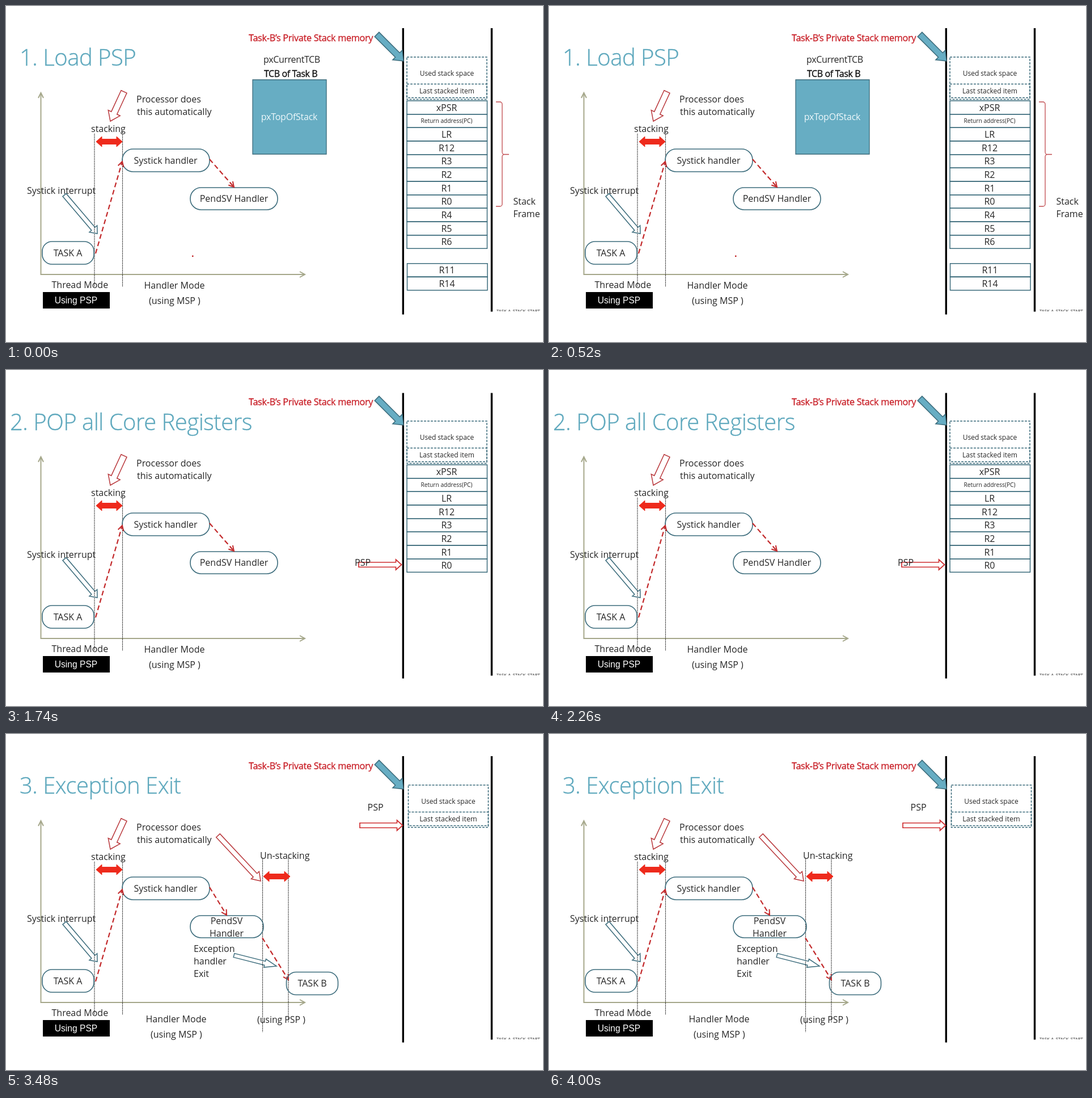
An HTML page with a canvas for the animation above (4350 ms loop, 947 by 592 pixels).

```html
<!DOCTYPE html>
<html lang="en">
<head>
<meta charset="utf-8">
<title>Context switch</title>
<style>
html, body { margin: 0; width: 100%; height: 100%; overflow: hidden; background: #fff; }
canvas { display: block; }
</style>
</head>
<body>
<canvas id="stage" width="947" height="592"></canvas>
<script>
const ctx = document.getElementById('stage').getContext('2d');
const STEP = 870;
const INK = '#262626', TEAL = '#3c6c7c', BLUE = '#67adc3', RED = '#ee2a1c', CRIMSON = '#c32a2c', AXIS = '#a5a78a';

function text(str, x, y, { size = 16, color = INK, align = 'left', weight = 400, family = 'Open Sans', bold = 0, spacing = 0 } = {}) {
  ctx.font = `${weight} ${size}px "${family}", sans-serif`;
  ctx.letterSpacing = `${spacing}px`;
  ctx.textAlign = align;
  ctx.fillStyle = color;
  ctx.fillText(str, x, y);
  if (bold) {
    ctx.strokeStyle = color;
    ctx.lineWidth = bold;
    ctx.strokeText(str, x, y);
  }
}

function centered(str, x, y, options) {
  text(str, x, y, { ...options, align: 'center' });
}

function path(points, { color = TEAL, width = 1.5, dash = [], close = false, fill } = {}) {
  ctx.beginPath();
  points.forEach(([x, y]) => ctx.lineTo(x, y));
  if (close) ctx.closePath();
  if (fill) {
    ctx.fillStyle = fill;
    ctx.fill();
  }
  ctx.strokeStyle = color;
  ctx.lineWidth = width;
  ctx.setLineDash(dash);
  ctx.stroke();
  ctx.setLineDash([]);
}

function box(x, y, w, h, options) {
  path([[x, y], [x + w, y], [x + w, y + h], [x, y + h]], { ...options, close: true });
}

function pill(x, y, w, h, r = 19) {
  ctx.beginPath();
  ctx.roundRect(x, y, w, h, r);
  ctx.strokeStyle = TEAL;
  ctx.lineWidth = 1.6;
  ctx.stroke();
}

// Maps (along, across) offsets measured back from the tip of a segment.
function fromTip(x1, y1, x2, y2) {
  const len = Math.hypot(x2 - x1, y2 - y1);
  const ux = (x2 - x1) / len, uy = (y2 - y1) / len;
  return { len, at: (back, side) => [x2 - ux * back - uy * side, y2 - uy * back + ux * side] };
}

function blockArrow(x1, y1, x2, y2, shaft, head, headLen, options) {
  const { len, at } = fromTip(x1, y1, x2, y2);
  const s = shaft / 2, h = head / 2;
  path([at(len, s), at(headLen, s), at(headLen, h), at(0, 0), at(headLen, -h), at(headLen, -s), at(len, -s)],
    { ...options, close: true });
}

function dashedArrow(x1, y1, x2, y2) {
  const { at } = fromTip(x1, y1, x2, y2);
  path([[x1, y1], [x2, y2]], { color: CRIMSON, width: 2.2, dash: [8.5, 5] });
  path([at(9, 5), at(0, 0), at(9, -5)], { color: CRIMSON, width: 2 });
}

function doubleArrow(x1, x2, y) {
  const half = [[x1, y], [x1 + 10, y - 9], [x1 + 10, y - 4.5], [x2 - 10, y - 4.5], [x2 - 10, y - 9], [x2, y]];
  const mirror = half.slice(1, -1).reverse().map(([px, py]) => [px, 2 * y - py]);
  path([...half, ...mirror], { color: RED, width: 1, fill: RED, close: true });
}

function dotted(x, top, bottom) {
  path([[x, top], [x, bottom]], { color: '#222', width: 1.1, dash: [2, 1] });
}

function title(str, x, y) {
  text(str, x, y, { size: 40, weight: 300, color: '#5ea8bd', bold: 0.4, spacing: -0.5 });
}

function chart(exiting) {
  path([[61.5, 154], [61.5, 473], [526, 473]], { color: AXIS, width: 2 });
  path([[57, 162], [61.5, 153], [66, 162]], { color: AXIS, width: 2 });
  path([[518, 468], [527, 473], [518, 478]], { color: AXIS, width: 2 });
  dotted(156, 225, 495);
  dotted(205.5, 222, 495);

  pill(64, 415, 91, 40, 17);
  centered('TASK A', 109, 441);
  pill(205, 252, 154, 40);
  centered('Systick handler', 281.5, 278);

  text('Processor does', 230, 170);
  text('this automatically', 231, 192);
  text('stacking', 150, 222);
  text('Systick interrupt', 37, 331);
  text('Thread Mode', 80.5, 497);
  doubleArrow(159, 205, 239);
  blockArrow(208, 151, 184, 203, 11, 23, 16, { color: '#b9383c' });
  blockArrow(103, 333, 161, 401, 8, 18, 11);
  dashedArrow(158, 436, 205, 274);

  const dx = exiting ? 3 : 0, dy = exiting ? 10 : 0;
  text('Handler Mode', 243.5 + dx, 498 + dy);
  text('(using MSP )', 252 + dx, 524.5 + dy);
  ctx.fillStyle = '#000';
  ctx.fillRect(65, 504, 118, 29);
  centered('Using PSP', 123.5, 524, { size: 15.6, color: '#fff', family: 'Liberation Sans' });

  if (!exiting) {
    pill(325, 320, 154, 39);
    centered('PendSV Handler', 402, 345);
    dashedArrow(359, 270, 402, 319);
  }
}

function exitPath() {
  dotted(452.5, 218, 525);
  dotted(498, 218, 509);
  pill(325, 320, 129, 39);
  centered('PendSV', 389, 335);
  centered('Handler', 389, 357);
  ['Exception', 'handler', 'Exit'].forEach((word, i) => text(word, 331, 384 + 22 * i));
  text('Un-stacking', 448, 220);
  doubleArrow(454, 501, 251);
  blockArrow(374, 179, 449, 259, 9, 19, 14, { color: '#b9383c' });
  blockArrow(402, 390, 477, 409, 7, 15, 21);
  dashedArrow(359, 270, 389, 319);
  dashedArrow(452, 359, 498, 433);
}

function memory(top) {
  path([[700.3, top], [700.3, 543.5]], { color: '#000', width: 3.4 });
  path([[856.5, top], [856.5, 538.5]], { color: '#000', width: 3.4 });
  text('Task-B’s Private Stack memory', 428, 62, { size: 16.2, color: '#c9222a', bold: 0.35, spacing: -0.27 });
  blockArrow(654, 50, 701, 97, 11, 24, 15, { fill: BLUE, color: TEAL });
  ctx.save();
  ctx.beginPath();
  ctx.rect(860, 528, 87, 10);
  ctx.clip();
  text('TASK-A_STACK_START', 865, 539.5, { size: 7.8 });
  ctx.restore();
}

function cell(label, x, y, size = 16) {
  box(x, y, 141.5, 23.67);
  centered(label, x + 70, y + 11.8 + size * 0.36, { size });
}

function stack(x, rowCount, itemSize = 12) {
  const dash = [4, 2];
  box(x, 90, 141, 74.5, { dash });
  box(x, 137.5, 141, 24, { dash });
  centered('Used stack space', x + 70.5, 123, { size: 12 });
  centered('Last stacked item', x + 70.5, 154, { size: itemSize });
  ['xPSR', 'Return address(PC)', 'LR', 'R12', 'R3', 'R2', 'R1', 'R0', 'R4', 'R5', 'R6']
    .slice(0, rowCount)
    .forEach((label, i) => cell(label, x, 167 + 23.67 * i, i === 1 ? 10.2 : 16));
}

function savedRegisters() {
  cell('R11', 707.5, 453.8);
  cell('R14', 707.5, 477);
}

function brace(x, labelX, labelY) {
  const top = 169, mid = 261.5, bottom = 353, spine = x + 11;
  ctx.beginPath();
  ctx.moveTo(x, top);
  ctx.arcTo(spine, top, spine, mid, 4);
  ctx.arcTo(spine, mid, x + 23, mid, 4);
  ctx.lineTo(x + 23, mid);
  ctx.arcTo(spine, mid, spine, bottom, 4);
  ctx.arcTo(spine, bottom, x, bottom, 4);
  ctx.lineTo(x, bottom);
  ctx.strokeStyle = '#c04a4e';
  ctx.lineWidth = 1.3;
  ctx.stroke();
  text('Stack', labelX, labelY);
  text('Frame', labelX, labelY + 22);
}

function controlBlock(x, y) {
  centered('pxCurrentTCB', x + 69, y - 30, { spacing: -0.35 });
  centered('TCB of Task B', x + 67, y - 5.5, { color: '#111', bold: 0.35, spacing: -0.4 });
  box(x, y, 130, 131, { fill: BLUE, color: TEAL, width: 1.3 });
  centered('pxTopOfStack', x + 64.5, y + 71, { color: '#eef8fb', spacing: -0.25 });
}

function pointer(x, y, labelX, labelY) {
  blockArrow(x, y, x + 75.5, y, 8.5, 18, 10, { color: '#cf2e30', width: 1.7 });
  text('PSP', labelX, labelY);
}

function loadPsp(blockX, blockY) {
  title('1. Load PSP', 24, 105);
  chart(false);
  memory(39);
  stack(707, 11);
  savedRegisters();
  brace(864, 894.5, 349.5);
  controlBlock(blockX, blockY);
}

function exceptionExit(top, rowCount) {
  title('3. Exception Exit', 24, 105);
  chart(true);
  exitPath();
  memory(top);
  stack(709.5, rowCount, 12.6);
}

const scenes = [
  () => {
    loadPsp(435, 130);
    ctx.fillStyle = CRIMSON;
    ctx.fillRect(328, 439.5, 2.5, 2.5);
  },
  () => {
    loadPsp(436, 128);
    text('Store the value of pxTopOfStack', 440.5, 388.5, { size: 15.8 });
    text('In to PSP', 440, 410.5);
    path([[567, 195.5], [674, 195.5], [674, 476]], { color: RED, width: 4.5 });
    path([[664, 459], [674, 476], [684.5, 459]], { color: RED, width: 4.5 });
    pointer(623.5, 489, 615, 479);
  },
  () => {
    title('2. POP all Core Registers', 7, 106);
    chart(false);
    memory(40.5);
    stack(707, 8);
    pointer(622, 343, 615, 345);
  },
  () => {
    exceptionExit(40.5, 8);
    brace(866.5, 881.5, 361.5);
    pointer(624, 340.5, 637.5, 311);
  },
  () => {
    exceptionExit(39, 0);
    pill(494.5, 419.5, 91, 40, 17);
    centered('TASK B', 540, 445);
    text('(using PSP )', 443, 509, { size: 15.8 });
    pointer(624, 161, 637.5, 134.5);
  }
];

function draw() {
  ctx.fillStyle = '#fff';
  ctx.fillRect(0, 0, 947, 592);
  scenes[Math.floor(performance.now() / STEP) % scenes.length]();
  requestAnimationFrame(draw);
}
draw();
</script>
</body>
</html>
```
